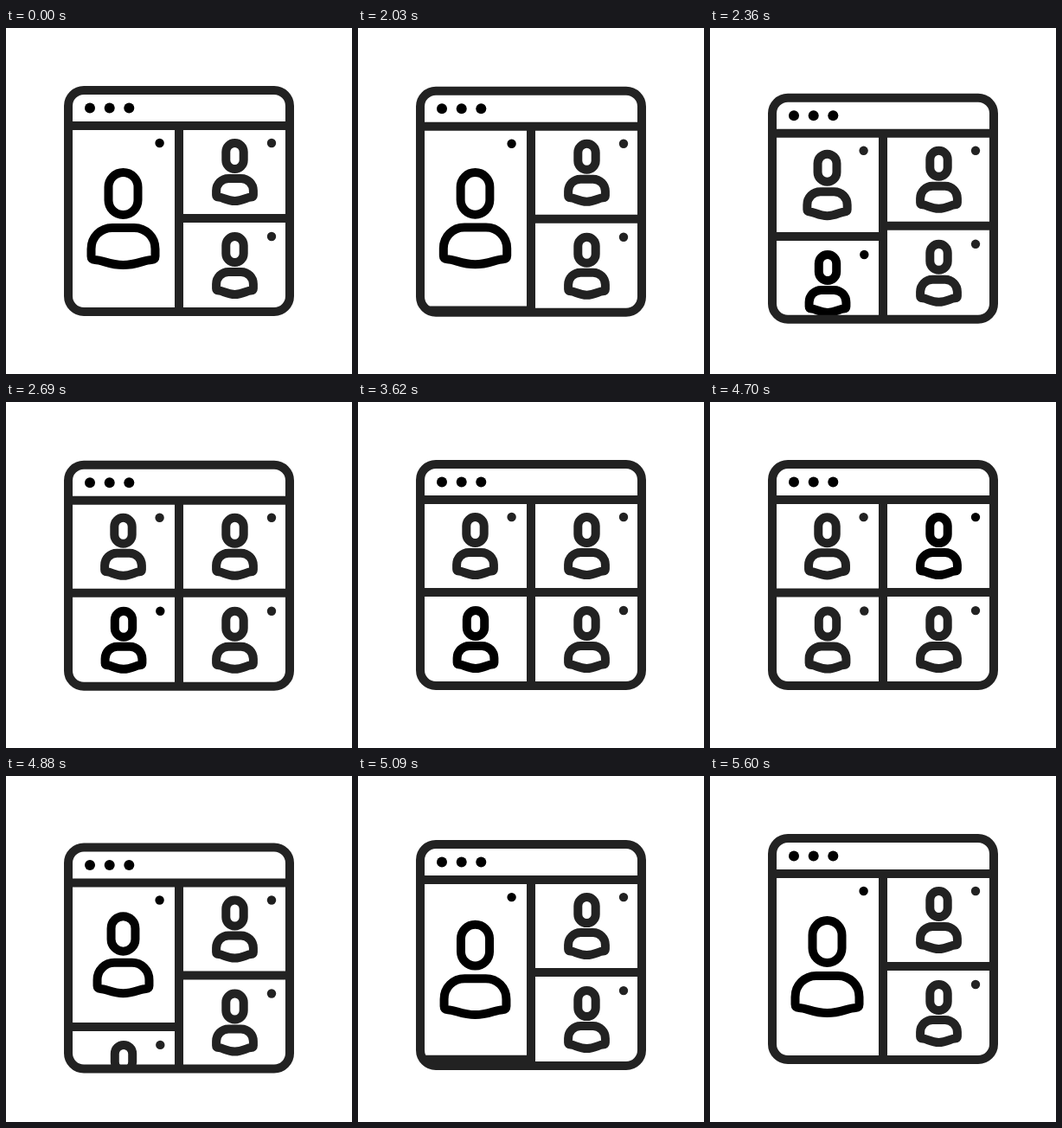
An HTML page that plays this animation: 400x400 px, repeating every 5.66 s.

```html
<!DOCTYPE html>
<html lang="en">
<head>
<meta charset="utf-8">
<title>Video call layout</title>
<style>
  html, body { margin: 0; width: 100%; height: 100%; overflow: hidden; background: #fff; }
  svg { display: block; width: 100%; height: 100%; }
  .line { fill: none; stroke: #222; stroke-width: 10; stroke-linecap: butt; stroke-linejoin: round; }
</style>
</head>
<body>
<svg viewBox="0 0 400 400">
  <defs>
    <clipPath id="inside"><rect x="72" y="72" width="256" height="256" rx="18"/></clipPath>
  </defs>
  <g id="win">
    <g clip-path="url(#inside)">
      <path id="split" class="line"/>
      <g id="people"></g>
    </g>
    <path class="line" d="M72 113H328M200 113V328M200 220H328"/>
    <rect class="line" x="72" y="72" width="256" height="256" rx="18"/>
    <circle cx="97" cy="92.5" r="6"/>
    <circle cx="119.7" cy="92.5" r="6"/>
    <circle cx="142.3" cy="92.5" r="6"/>
  </g>
</svg>
<script>
const LOOP = 5660, ROW = 108;
const SPLIT = 2010, SWAP = 3720, MERGE = 4695, MORPH = 580;
const SMALL = { headTop: 133, headEnd: 163, headW: 10.2, top: 174, side: 195.5, end: 200, w: 21.4 };
const BIG = { headTop: 167, headEnd: 216, headW: 17, top: 231, side: 268, end: 274, w: 37 };

const $ = id => document.getElementById(id);
const clamp = x => Math.min(1, Math.max(0, x));
const mix = (a, b, k) => a + (b - a) * k;

// cubic-bezier(.25, .1, .25, 1)
function ease(x) {
  x = clamp(x);
  if (x === 0 || x === 1) return x;
  const bez = (a, b, s) => 3 * a * s * (1 - s) ** 2 + 3 * b * s * s * (1 - s) + s ** 3;
  let lo = 0, hi = 1;
  for (let i = 0; i < 24; i++) {
    const mid = (lo + hi) / 2;
    if (bez(0.25, 0.25, mid) < x) lo = mid; else hi = mid;
  }
  return bez(0.1, 1, lo);
}

// Quick drop, slower return
function bob(t, start, rise, fall, depth) {
  const u = t - start;
  return depth * (u < rise ? ease(u / rise) : 1 - ease((u - rise) / fall));
}

function node(tag, parent) {
  return parent.appendChild(document.createElementNS("http://www.w3.org/2000/svg", tag));
}

function personPath(cx, s) {
  const { headTop, headEnd, headW: h, top, side, end, w } = s;
  const r = 0.66 * w, c = 0.11 * w, q = 0.44 * r;
  const L = cx - w, R = cx + w;
  const head = `M${cx - h} ${headTop + h}A${h} ${h} 0 0 1 ${cx + h} ${headTop + h}` +
    `V${headEnd - h}A${h} ${h} 0 0 1 ${cx - h} ${headEnd - h}Z`;
  const body = `M${L} ${side - c}V${top + r}C${L} ${top + q} ${L + q} ${top} ${L + r} ${top}` +
    `H${R - r}C${R - q} ${top} ${R} ${top + q} ${R} ${top + r}V${side - c}` +
    `Q${R} ${side} ${R - c} ${side}C${cx + 0.65 * w} ${side} ${cx + 0.43 * w} ${end} ${cx} ${end}` +
    `S${cx - 0.65 * w} ${side} ${L + c} ${side}Q${L} ${side} ${L} ${side - c}Z`;
  return head + body;
}

function makePerson(cx, dotX) {
  const g = node("g", $("people"));
  const path = node("path", g), dot = node("circle", g);
  path.setAttribute("class", "line");
  dot.setAttribute("cx", dotX);
  dot.setAttribute("cy", 133);
  dot.setAttribute("r", 5.2);
  return (shape, dy, active, dotOn) => {
    const v = Math.round(34 * (1 - active)), color = `rgb(${v},${v},${v})`;
    g.setAttribute("transform", `translate(0 ${dy})`);
    path.setAttribute("d", personPath(cx, shape));
    path.style.stroke = color;
    dot.setAttribute("fill", color);
    dot.setAttribute("visibility", dotOn ? "visible" : "hidden");
  };
}

const upLeft = makePerson(135.5, 177.6), lowLeft = makePerson(136, 178.3);
const upRight = makePerson(264.5, 307), lowRight = makePerson(264.5, 307);

function draw(t) {
  const within = (a, b) => t >= a && t < b;
  const p = ease((t - SPLIT) / MORPH) - ease((t - MERGE) / MORPH);
  const swap = clamp((t - SWAP - 40) / 150);
  const back = clamp((t - MERGE) / 200);
  const drop = bob(t, SPLIT, 250, 640, 11) + bob(t, SWAP, 150, 300, 3) + bob(t, MERGE, 250, 640, 11);
  const shift = ROW * (1 - p);

  const shape = {};
  for (const k in SMALL) shape[k] = mix(BIG[k], SMALL[k], p);

  $("win").setAttribute("transform", `translate(0 ${drop})`);
  $("split").setAttribute("d", `M72 ${220 + shift}H200`);
  upLeft(shape, 0, 1 - clamp((t - SPLIT) / 200) + back, true);
  lowLeft(SMALL, ROW + shift, 1 - swap, !within(3140, 3320) && !within(3620, 3800));
  upRight(SMALL, 0, swap - back, !within(4310, 4520));
  lowRight(SMALL, ROW, 0, true);
}

let began;
function tick(now) {
  began ??= now;
  draw((now - began) % LOOP);
  requestAnimationFrame(tick);
}
draw(0);
requestAnimationFrame(tick);
</script>
</body>
</html>
```
